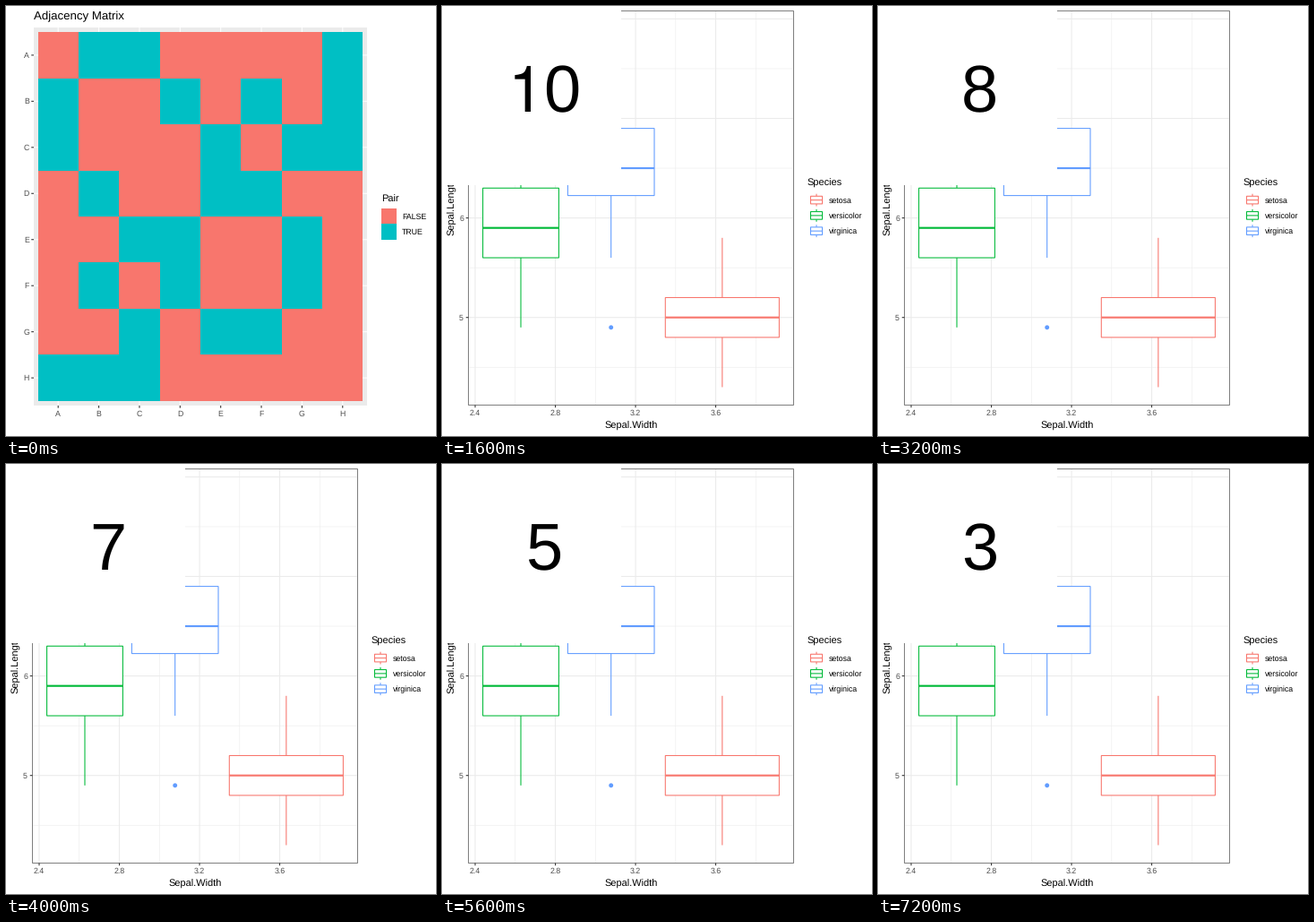
A matplotlib script that plays this animation: 480 px wide and 480 px high, repeating every 8 s.

```python
import matplotlib.pyplot as plt
from matplotlib.animation import FuncAnimation
from matplotlib.patches import Circle, PathPatch, Rectangle
from matplotlib.path import Path

plt.rcParams["font.family"] = "Liberation Sans"
plt.rcParams["text.hinting"] = "none"

SIZE, DPI = 480, 100
PT = 72 / DPI  # points per pixel
THIN, LINE, THICK = 0.53, 1.07, 2.13
RED, TEAL, GREEN, BLUE = "#F8766D", "#00BFC4", "#00BA38", "#619CFF"
GRID, TICK, LABEL = "#EBEBEB", "#333333", "#4D4D4D"

fig = plt.figure(figsize=(SIZE / DPI, SIZE / DPI), dpi=DPI, facecolor="white")
ax = fig.add_axes([0, 0, 1, 1])
ax.set_xlim(0, SIZE)
ax.set_ylim(SIZE, 0)
ax.axis("off")


class Layer:
    """A group of artists, in pixel coordinates, shown or hidden together."""

    count = 0

    def __init__(self):
        self.artists = []

    def keep(self, artist):
        Layer.count += 1
        artist.set_zorder(Layer.count)
        self.artists.append(artist)
        return artist

    def rect(self, x0, y0, x1, y1, fill, edge="none", width=0):
        # Fills sit on whole pixels, outlines are antialiased.
        self.keep(ax.add_patch(Rectangle(
            (x0, y0), x1 - x0, y1 - y0, facecolor=fill, edgecolor=edge,
            linewidth=width * PT, joinstyle="miter", snap=edge == "none")))

    def line(self, x0, y0, x1, y1, color, width=LINE):
        self.keep(ax.plot([x0, x1], [y0, y1], color=color, lw=width * PT,
                          solid_capstyle="butt", snap=False)[0])

    def text(self, x, y, s, size=8.8, color="black", ha="left", rotation=0):
        return self.keep(ax.text(
            x, y, s, fontsize=size * PT, color=color, ha=ha, va="baseline",
            rotation=rotation, rotation_mode="anchor"))

    def show(self, on):
        for artist in self.artists:
            artist.set_visible(on)


def draw_matrix():
    layer = Layer()
    left, top, right, bottom = 31, 24, 403, 446
    step_x, step_y = (right - left) / 8.2, (bottom - top) / 8.2
    names = "ABCDEFGH"

    def px(i):
        return left + (i + 0.6) * step_x

    def py(i):
        return top + (i + 0.6) * step_y

    layer.rect(left, top, right, bottom, GRID)
    for i in range(8):
        layer.line(px(i), top, px(i), bottom, "white")
        layer.line(left, py(i), right, py(i), "white")
    layer.rect(px(-0.5), py(-0.5), px(7.5), py(7.5), RED)
    for pair in "AB AC AH BD BF BH CE CG CH DE DF EG FG".split():
        a, b = (names.index(c) for c in pair)
        for col, row in ((a, b), (b, a)):
            layer.rect(px(col - 0.5), py(row - 0.5),
                       px(col + 0.5), py(row + 0.5), TEAL)
    for i, name in enumerate(names):
        layer.line(px(i), bottom, px(i), bottom + 2.75, TICK)
        layer.line(left - 2.75, py(i), left, py(i), TICK)
        layer.text(px(i), 458, name, color=LABEL, ha="center")
        layer.text(26, py(i) + 3.1, name, color=LABEL, ha="right")

    layer.text(31, 15, "Adjacency Matrix", 13.2)
    layer.text(419, 219, "Pair", 11)
    for i, (name, color) in enumerate((("FALSE", RED), ("TRUE", TEAL))):
        y = 226 + 17.28 * i
        layer.rect(419, y, 436.3, y + 17.28, color)
        layer.text(442, y + 12, name)
    return layer


def draw_boxplot():
    layer = Layer()
    left, top, right, bottom = 29.5, 5.5, 392.5, 445.5

    def px(v):
        return 37 + (v - 2.4) * 223.8

    def py(v):
        return top + (8.08 - v) * 111.1

    for i in range(4):
        x, y = px(2.6 + 0.4 * i), py(4.5 + i)
        layer.line(x, top, x, bottom, GRID, THIN)
        layer.line(left, y, right, y, GRID, THIN)
    for i in range(4):
        x, y = px(2.4 + 0.4 * i), py(5 + i)
        layer.line(x, top, x, bottom, GRID)
        layer.line(left, y, right, y, GRID)

    # color, box sides, then low whisker, quartiles and high whisker
    boxes = (
        (GREEN, 45.6, 130.4, 4.9, 5.6, 5.9, 6.3, 7.0),
        (BLUE, 140.4, 237.0, 5.6, 6.225, 6.5, 6.9, 7.9),
        (RED, 249.3, 376.4, 4.3, 4.8, 5.0, 5.2, 5.8),
    )
    for color, x0, x1, low, q1, mid, q3, high in boxes:
        x = (x0 + x1) / 2
        layer.line(x, py(q3), x, py(high), color)
        layer.line(x, py(q1), x, py(low), color)
        layer.rect(x0, py(q3), x1, py(q1), "white", color, LINE)
        layer.line(x0, py(mid), x1, py(mid), color, THICK)
    layer.keep(ax.add_patch(Circle((188.7, py(4.9)), 2.45, facecolor=BLUE,
                                   edgecolor="none")))
    layer.rect(left, top, right, bottom, "none", "#7F7F7F", 1)

    for i in range(4):
        x, y = px(2.4 + 0.4 * i), py(5 + i)
        layer.line(x, bottom, x, bottom + 2.75, TICK)
        layer.line(left - 2.75, y, left, y, TICK)
        layer.text(x, 457, f"{2.4 + 0.4 * i:.1f}", color=LABEL, ha="center")
        layer.text(24, y + 3.1, str(5 + i), color=LABEL, ha="right")
    layer.text(211, 472, "Sepal.Width", 11, ha="center")
    layer.text(14, 224, "Sepal.Length", 11, ha="center", rotation=90)

    layer.text(408, 201, "Species", 11)
    species = (("setosa", RED), ("versicolor", GREEN), ("virginica", BLUE))
    for i, (name, color) in enumerate(species):
        x, y = 418, 216.6 + 17.28 * i
        layer.line(x, y - 6.9, x, y - 4.3, color)
        layer.line(x, y + 4.3, x, y + 6.9, color)
        layer.rect(x - 6.5, y - 4.3, x + 6.5, y + 4.3, "white", color, LINE)
        layer.line(x - 6.5, y, x + 6.5, y, color)
        layer.text(432, y + 3.2, name)
    return layer


def draw_footless_one(layer, x, y, em):
    """A figure one with a curved flag and no foot; x, y is its pen origin."""
    outline = [(0.259, 0.505), (0.259, 0), (0.347, 0), (0.347, 0.709),
               (0.289, 0.709), (0.258, 0.600), (0.238, 0.585),
               (0.102, 0.568), (0.102, 0.505), (0.259, 0.505)]
    codes = [Path.MOVETO] + [Path.LINETO] * 4 + [Path.CURVE4] * 3
    codes += [Path.LINETO] * 2
    points = [(x + em * u, y - em * v) for u, v in outline]
    layer.keep(ax.add_patch(PathPatch(Path(points, codes), facecolor="black",
                                      edgecolor="none")))


matrix = draw_matrix()
boxplot = draw_boxplot()
counter = Layer()
counter.rect(0, 0, 200, 200, "white")
digit = counter.text(93, 118, "0", 74)
ten = Layer()
draw_footless_one(ten, 74, 118, 72)


def update(frame):
    number = 12 - frame
    matrix.show(frame == 0)
    boxplot.show(frame > 0)
    counter.show(frame > 1)
    ten.show(number == 10)
    digit.set_text(str(number % 10))
    digit.set_x(113 if number == 10 else 93)
    return []


anim = FuncAnimation(fig, update, frames=10, interval=800, repeat=True,
                     repeat_delay=0, blit=False)
plt.show()
```
